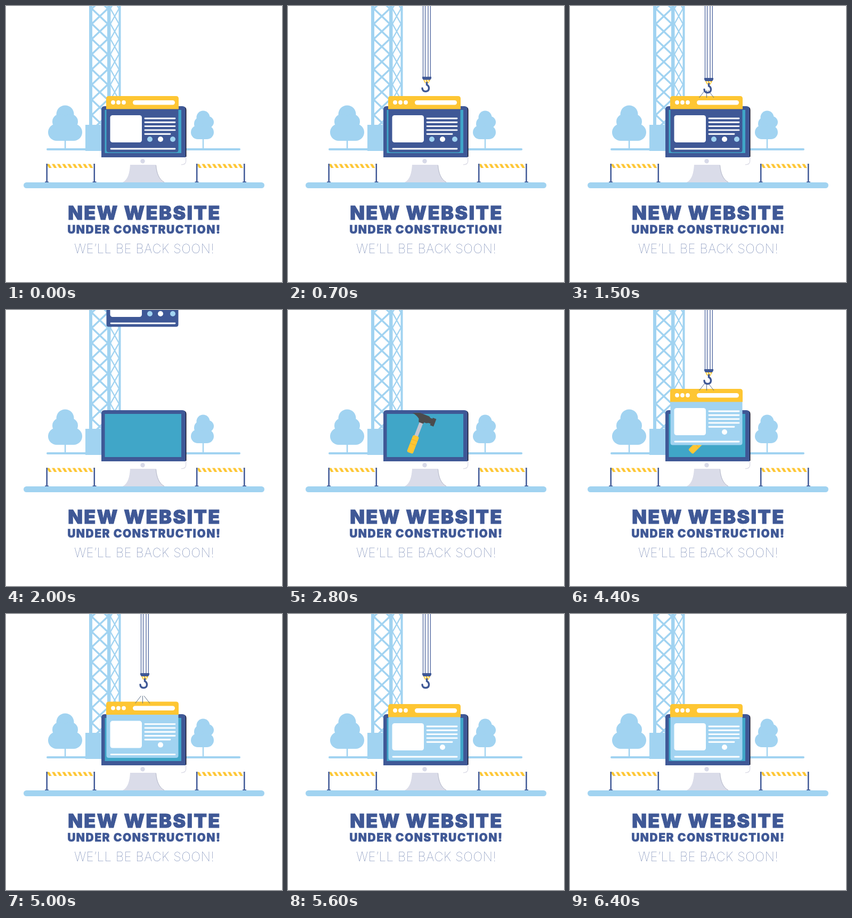
These frames come from a looping animation (518 px wide and 518 px high, 6.7 s). An HTML page:

```html
<!DOCTYPE html>
<html lang="en">
<head>
<meta charset="utf-8">
<title>Under construction</title>
<style>
html, body { margin: 0; width: 100%; height: 100%; overflow: hidden; background: #fff; }
svg { display: block; width: 100vw; height: 100vh; }
text { font-family: Inter, "Open Sans", sans-serif; text-anchor: middle; fill: #3f5896; }
.sky { fill: #a1d3f1; }
.skyline { fill: none; stroke: #a1d3f1; }
.navy { fill: #3f5896; }
.gold { fill: #fec633; }
.white { fill: #fff; }
</style>
</head>
<body>
<svg viewBox="0 0 518 518">
  <defs>
    <pattern id="tape" width="9.7" height="8" patternUnits="userSpaceOnUse">
      <rect width="9.7" height="8" fill="#fff"/>
      <path class="gold" d="M0 0H5L9.7 8H4.7Z"/>
    </pattern>
    <clipPath id="glass"><rect x="186" y="193" width="143" height="83"/></clipPath>
    <g id="barrier">
      <rect x="2" y="296.5" width="87" height="7.5" fill="url(#tape)"/>
      <path d="M0.7 296V331M89.8 296V331" stroke="#3f5896" stroke-width="2.5"/>
      <path d="M-3 330.3H4M86.5 330.3H93.5" stroke="#3f5896" stroke-width="1.6"/>
    </g>
  </defs>
  <rect width="518" height="518" fill="#fff"/>

  <!-- crane mast -->
  <path class="sky" d="M156 0H162V224H156ZM190 0H196.5V224H190ZM211.5 0H215.5V224H211.5Z"/>
  <path id="front" class="skyline" stroke-width="3.4"/>
  <path id="side" class="skyline" stroke-width="2.4"/>
  <rect class="sky" x="149" y="223" width="36" height="49"/>

  <!-- landscape -->
  <path class="skyline" d="M78 269H438" stroke-width="4" stroke-linecap="round"/>
  <g class="sky">
    <circle cx="111" cy="203" r="16.5"/><circle cx="101" cy="217" r="14"/><circle cx="121" cy="217" r="14"/>
    <circle cx="95" cy="237" r="16"/><circle cx="127" cy="237" r="16"/><rect x="95" y="222" width="32" height="31"/>
    <rect x="109.8" y="240" width="2.6" height="29"/>
    <circle cx="370" cy="209" r="12.5"/><circle cx="366" cy="221" r="13"/><circle cx="379" cy="218" r="11"/>
    <circle cx="360" cy="237" r="13"/><circle cx="377" cy="237" r="13"/><rect x="360" y="230" width="17" height="20"/>
    <rect x="368.8" y="240" width="2.4" height="29"/>
    <rect x="33" y="331" width="452" height="11" rx="5.5"/>
  </g>
  <use href="#barrier" x="76"/>
  <use href="#barrier" x="357.5"/>

  <!-- monitor -->
  <path fill="#dadce9" d="M233 298H282C283 313 288 326 298 331H219C229 326 232 313 233 298Z"/>
  <path fill="none" stroke="#b9bccb" d="M281.5 299C282.5 314 287.5 326 297 330.5"/>
  <path fill="#17172f" d="M300 189H332Q338.5 189 338.5 195V283H300Z"/>
  <path class="white" d="M179 283H338V292Q338 298 331 298H185Q179 298 179 292Z"/>
  <path fill="none" stroke="#dcdce6" stroke-width="1.4" d="M337.6 284V291.5Q337.6 297.6 329 297.8"/>
  <path class="navy" d="M179 284V194Q179 188 185 188H331Q337 188 337 194V284Z"/>
  <rect x="185.5" y="195" width="143.5" height="81" fill="#40a6c8"/>
  <circle cx="256.5" cy="291.2" r="4.2" fill="#d7d9e8"/>

  <!-- hammer -->
  <g clip-path="url(#glass)">
    <g id="hammer">
      <rect x="-3.5" y="-57" width="7" height="34" fill="#c3c6d2"/>
      <rect class="gold" x="-6" y="-27" width="12" height="34" rx="3"/>
      <path d="M-6 -18H6M-6 -10H6" stroke="#eeb32a" stroke-width="1"/>
      <path fill="#4b4b4d" d="M-23 -65Q-16 -71 -6 -70H10L13 -68H17V-70H24V-55H17V-58H13L9 -56H5L4 -53H-5L-7 -59Q-14 -64 -23 -65Z"/>
    </g>
  </g>

  <!-- browser window, drawn from its top edge -->
  <g id="win">
    <path id="body" d="M188.5 20H323.5V101Q323.5 105.5 319 105.5H193Q188.5 105.5 188.5 101Z"/>
    <path class="gold" d="M188 24.5V5Q188 0 193 0H319Q324 0 324 5V24.5Z"/>
    <g class="white">
      <circle cx="201" cy="12" r="3.9"/><circle cx="211" cy="12" r="3.9"/><circle cx="221" cy="12" r="3.9"/>
      <rect x="238" y="8" width="79" height="8.4" rx="4.2"/>
      <rect x="195.5" y="36" width="59.5" height="51" rx="4.5"/>
      <circle cx="290" cy="81" r="5"/>
    </g>
    <path id="lines" fill="none" stroke="#fff" stroke-width="2.9" stroke-linecap="round"/>
    <g class="sky"><circle cx="270" cy="81" r="5"/><circle cx="313" cy="81" r="5"/></g>
    <path id="wires" d="M253.5 -11L242.5 3M256.5 -11V3M259 -11L270 3" fill="none" stroke="#5a6d86" stroke-width="1"/>
  </g>

  <!-- hook, drawn from the top of its block -->
  <g id="hook">
    <path d="M253.5 -260V1M257.5 -260V1M263 -260V1M267.3 -260V1" stroke="#3f5896" stroke-width="1.2"/>
    <path class="navy" d="M252 0H269V3L267 6H254L252 3Z"/>
    <path class="gold" d="M254 6H267L264 12H257Z"/>
    <path d="M257 6L260 12M262 6L264 10" stroke="#fff" stroke-width="1.6"/>
    <path d="M260.5 11V15C266 18 266 27 259 27.5C254.5 28 252 25 252 21.5" fill="none" stroke="#3f5896" stroke-width="3.4" stroke-linecap="round"/>
  </g>

  <text x="260" y="401" font-size="36" font-weight="900" letter-spacing="2.3" stroke="#3f5896" stroke-width="1">NEW WEBSITE</text>
  <text x="259.3" y="427" font-size="21" font-weight="900" letter-spacing="1.5" stroke="#3f5896" stroke-width="0.5">UNDER CONSTRUCTION!</text>
  <text x="260" y="464.3" font-size="23.5" font-weight="100" letter-spacing="0.7" opacity="0.85">WE’LL BE BACK SOON!</text>
</svg>
<script>
const LOOP = 6700, STEP = 100, LAST = 6400;
const REST = 169, HANG = 148, LIFT_GAP = 34, DROP_GAP = 37;
const $ = id => document.getElementById(id);

const lattice = (x0, x1, pitch = 28.5) => {
  let d = '';
  for (let y = 5 - pitch; y < 224; y += pitch) {
    d += `M${x0} ${y}L${x1} ${y + pitch}M${x1} ${y}L${x0} ${y + pitch}`;
  }
  return d;
};
$('front').setAttribute('d', lattice(161, 191));
$('side').setAttribute('d', lattice(196, 212));

let rows = 'M197 99H317';
for (let i = 0; i < 5; i++) rows += `M261 ${42 + i * 7.3}H${i < 4 ? 317 : 308}`;
$('lines').setAttribute('d', rows);

const ramp = (t, a, b) => Math.min(1, Math.max(0, (t - a) / (b - a)));
const smooth = u => u * u * (3 - 2 * u);
const move = (t, a, b, from, to) => from + (to - from) * smooth(ramp(t, a, b));
const show = (el, on) => el.setAttribute('visibility', on ? 'visible' : 'hidden');

function winTop(t) {
  if (t < 2500) return move(t, 1500, 2150, REST, -112);
  if (t < 4400) return move(t, 2850, 4185, -110, HANG);
  return move(t, 4400, 5250, HANG, REST);
}

function hookTop(t) {
  if (t < 1500) return move(t, 0, 750, -40, REST - LIFT_GAP);
  if (t < 2500) return winTop(t) - LIFT_GAP;
  if (t < 4400) return winTop(t) - DROP_GAP;
  return move(t, 5800, 6350, HANG - DROP_GAP, -40);
}

function draw(t) {
  const dark = t < 2500;
  $('win').setAttribute('transform', `translate(0 ${winTop(t)})`);
  $('body').setAttribute('fill', dark ? '#3f5896' : '#a1d3f1');

  const wire = dark ? ramp(t, 800, 1400) : 1 - ramp(t, 5050, 5600);
  show($('wires'), wire > 0);
  $('wires').setAttribute('transform', `scale(1 ${wire})`);

  $('hook').setAttribute('transform', `translate(0 ${hookTop(t)})`);

  const size = smooth(ramp(t, 2150, 2500));
  const tilt = 34 - 20.5 * Math.cos((t - 3730) / 500 * 2 * Math.PI);
  show($('hammer'), size > 0 && t < 5000);
  $('hammer').setAttribute('transform', `translate(231 261.5) rotate(${tilt}) scale(${size})`);
}

function tick() {
  const t = performance.now() % LOOP;
  draw(Math.min(Math.floor(t / STEP) * STEP, LAST));
  requestAnimationFrame(tick);
}
tick();
</script>
</body>
</html>
```
